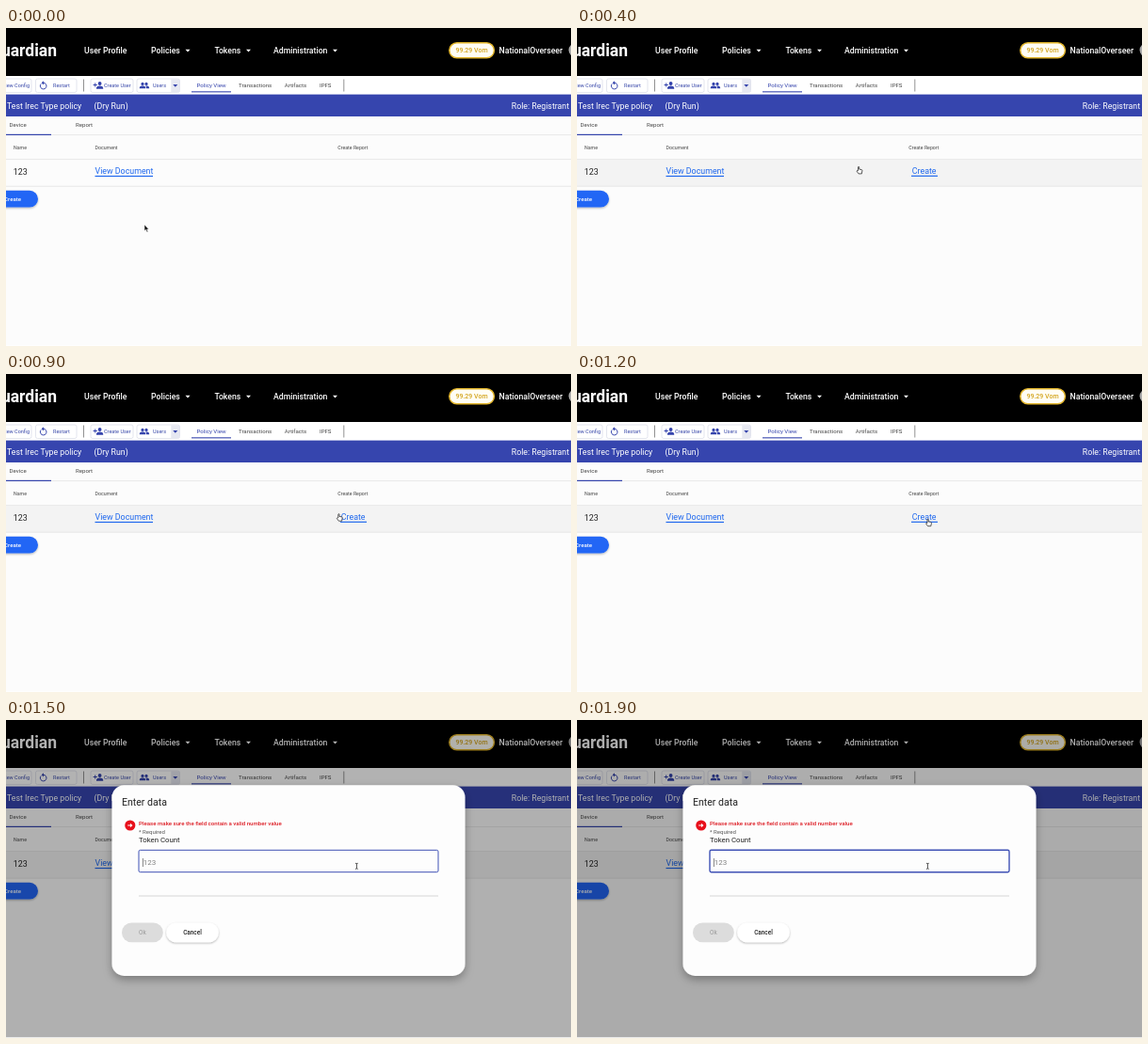
An HTML page that plays this animation: 600 by 338 pixels, repeating every 2 s.

```html
<!DOCTYPE html>
<html lang="en">
<head>
<meta charset="utf-8">
<title>Policy view</title>
<style>
  html, body { margin: 0; width: 100%; height: 100%; overflow: hidden; background: #fff; }
  svg { display: block; width: 100vw; height: 100vh; }
  text { font-family: Roboto, sans-serif; white-space: pre; }
  .m { font-weight: 500; }
  .nav { font-size: 8.7px; font-weight: 500; fill: #fff; }
  .tool { font-size: 5.5px; fill: #3646a8; }
  .tab { font-size: 6.1px; fill: #444; }
  .head { font-size: 5.25px; fill: #444; }
  .bar { font-size: 8.75px; fill: #fff; }
  .link { font-size: 8.85px; fill: #1f68ee; }
  .btn { fill: #fff; stroke: #dcdfea; stroke-width: .8; }
  .rule { stroke: #e2e2e2; stroke-width: .8; }
  .ink { fill: #3443ac; }
</style>
</head>
<body>
<svg viewBox="0 0 600 338" preserveAspectRatio="none">
  <defs>
    <filter id="soft" x="-20%" y="-30%" width="140%" height="180%">
      <feDropShadow dx="0" dy="1" stdDeviation="1" flood-opacity=".3"/>
    </filter>
    <filter id="deep" x="-10%" y="-15%" width="120%" height="140%">
      <feDropShadow dx="0" dy="4" stdDeviation="5" flood-opacity=".3"/>
    </filter>
  </defs>

  <rect width="600" height="338" fill="#fcfcfc"/>

  <!-- top navigation -->
  <rect width="600" height="51" fill="#000"/>
  <text x="54" y="30" text-anchor="end" font-size="17.5" font-weight="700" fill="#fff">Guardian</text>
  <g class="nav">
    <text x="83" y="26.5">User Profile</text>
    <text x="154" y="26.5">Policies</text>
    <text x="221.5" y="26.5">Tokens</text>
    <text x="284" y="26.5">Administration</text>
    <text x="523.5" y="26.5">NationalOverseer</text>
    <path d="M190.5 22.8h5l-2.5 2.6zM255 22.8h5l-2.5 2.6zM347 22.8h5l-2.5 2.6z"/>
  </g>
  <rect x="470.8" y="15.8" width="47.6" height="16" rx="8" fill="#fffdf4" stroke="#e3b62c" stroke-width="1.5"/>
  <text class="m" x="494.6" y="26.2" text-anchor="middle" font-size="7" fill="#d3a41d">99.29 Vorn</text>
  <circle cx="605" cy="23.5" r="7.5" fill="#aaa"/>

  <!-- toolbar -->
  <rect y="51" width="600" height="20" fill="#fff"/>
  <g class="btn">
    <rect x="-10" y="54" width="37" height="14.5" rx="2"/>
    <rect x="31.5" y="54" width="43.5" height="14.5" rx="2"/>
    <rect x="90" y="54" width="45" height="14.5" rx="2"/>
    <rect x="139" y="54" width="45.5" height="14.5" rx="2"/>
  </g>
  <rect x="175.3" y="54.4" width="8.8" height="13.7" fill="#e6e8f1"/>
  <path class="ink" d="M177.3 60h5l-2.5 2.8z"/>
  <path d="M82.5 54.5v13M358.8 54.5v13" stroke="#777" stroke-width=".8"/>
  <g class="tool">
    <text x="25" y="63" text-anchor="end">View Config</text>
    <text x="50" y="63">Restart</text>
    <text x="104" y="63">Create User</text>
    <text x="156" y="63">Users</text>
  </g>
  <path d="M37.2 59.4a3.3 3.3 0 1 0 2.4-1.1" fill="none" stroke="#3443ac" stroke-width="1"/>
  <path class="ink" d="M40 56.2v4.2l-2.4-2.1z"/>
  <g class="ink">
    <circle cx="99.6" cy="59" r="1.9"/>
    <path d="M96 64.8v-1c0-3 7.2-3 7.2 0v1zM94.2 58.4h1v1.6h1.6v1h-1.6v1.6h-1v-1.6h-1.6v-1h1.6z"/>
    <circle cx="145" cy="59.4" r="1.6"/>
    <circle cx="149" cy="59.4" r="1.6"/>
    <path d="M141.8 64.2v-.9c0-2.5 6.4-2.5 6.4 0v.9zM148.9 64.2v-.9c0-.8-.4-1.3-.9-1.6 2-.3 4.1.3 4.1 1.6v.9z"/>
  </g>
  <g class="tab">
    <text x="202.5" y="63" style="fill:#3443ac">Policy View</text>
    <text x="247" y="63">Transactions</text>
    <text x="295.7" y="63">Artifacts</text>
    <text x="333" y="63">IPFS</text>
  </g>
  <rect class="ink" x="197" y="67.3" width="42" height="1.1"/>

  <!-- title bar -->
  <rect y="70.6" width="600" height="23.4" fill="#3645ae"/>
  <g class="bar">
    <text x="1" y="86">Test Irec Type policy</text>
    <text x="93.5" y="86">(Dry Run)</text>
    <text x="598" y="86" text-anchor="end">Role: Registrant</text>
  </g>

  <!-- table -->
  <g class="tab">
    <text x="3.6" y="105.2">Device</text>
    <text x="74" y="105.2">Report</text>
  </g>
  <path class="rule" d="M0 113.6H600M0 139.6H600"/>
  <rect class="ink" y="112.8" width="48" height="1.2"/>
  <g class="head">
    <text x="8" y="129">Name</text>
    <text x="94.5" y="129">Document</text>
    <text x="352.3" y="129">Create Report</text>
  </g>
  <g id="hover">
    <rect y="140" width="600" height="28" fill="#f3f3f3"/>
    <text class="link" x="355.8" y="154.6">Create</text>
    <rect x="355" y="156.7" width="28" height="1.2" fill="#1f68ee"/>
  </g>
  <path class="rule" d="M0 168.2H600"/>
  <text x="7.7" y="155.5" font-size="8.9" fill="#222">123</text>
  <text class="link" x="94.5" y="154.8">View Document</text>
  <rect x="94.5" y="156.9" width="61.5" height="1.2" fill="#1f68ee"/>
  <rect x="-20" y="172.8" width="54" height="17.8" rx="8.9" fill="#2066f5" filter="url(#soft)"/>
  <text class="m" x="16" y="183.8" text-anchor="end" font-size="6.1" fill="#fff">Create</text>

  <rect id="shade" width="600" height="338" fill="#000"/>
  <rect y="337" width="600" height="1" fill="#fff" opacity=".75"/>

  <!-- dialog -->
  <g id="dialog">
    <rect x="112.5" y="69.3" width="375" height="202.6" rx="13" fill="#fdfdfd" filter="url(#deep)"/>
    <text x="123" y="90.5" font-size="10.55" fill="#222">Enter data</text>
    <circle cx="131.8" cy="112" r="5.6" fill="#e8101c"/>
    <path d="M129.2 111.5h2.7v-1.7l2.6 2.2-2.6 2.2v-1.7h-2.7z" fill="#fff"/>
    <text class="m" x="141" y="112.1" font-size="6.12" fill="#dd1a22">Please make sure the field contain a valid number value</text>
    <text x="141" y="120.6" font-size="6.05" fill="#555">* Required</text>
    <text x="141" y="130.4" font-size="7.8" fill="#222">Token Count</text>
    <rect id="field" x="141" y="138.3" width="318" height="23.4" rx="1.6" fill="none"/>
    <path d="M145.4 147v9" stroke="#333" stroke-width=".6"/>
    <text x="145.8" y="154.4" font-size="8" fill="#808080">123</text>
    <path d="M141 187H459" stroke="#ccc" stroke-width=".8"/>
    <rect x="123" y="215.6" width="43.8" height="20.6" rx="10.3" fill="#dcdcdc"/>
    <text x="144.8" y="228.2" text-anchor="middle" font-size="6.5" fill="#999">Ok</text>
    <rect x="170.2" y="215.6" width="55.6" height="20.6" rx="10.3" fill="#fff" filter="url(#soft)"/>
    <text class="m" x="198" y="228.2" text-anchor="middle" font-size="6.4" fill="#222">Cancel</text>
  </g>

  <!-- pointers, each drawn around its own centre -->
  <path id="arrow" d="M-2-4V2.6L-.5 1.3.7 4 1.8 3.5.7 1H2.6z" fill="#111" stroke="#fff" stroke-width=".5"/>
  <path id="hand" d="M-1.5.4V-3.2a.6.6 0 0 1 1.2 0V-1.1L2.2-.6Q3-.4 2.9.4L2.3 3.7H-1L-3 .9Q-2.7 0-1.5.4z" fill="#fff" stroke="#222" stroke-width=".75" stroke-linejoin="round"/>
  <path id="beam" d="M-1.3-3Q0-3 0-2.3Q0-3 1.3-3M0-2.4V2.4M-1.3 3Q0 3 0 2.3Q0 3 1.3 3" fill="none" stroke="#222" stroke-width=".8"/>
</svg>
<script>
  const LOOP = 2000, STEP = 100;
  const $ = id => document.getElementById(id);
  const show = (el, on) => el.setAttribute('visibility', on ? 'visible' : 'hidden');
  const pointers = { arrow: $('arrow'), hand: $('hand'), beam: $('beam') };

  // pointer stops: time, x, y
  const path = [
    [0, 149, 213], [200, 216, 179], [300, 267, 159], [400, 300, 151.2], [500, 306, 150.5],
    [600, 306, 150.5], [700, 317, 150.8], [900, 354.3, 152.5], [1000, 364, 154.5], [1200, 373.5, 158]
  ];

  function pointerAt(t) {
    const i = path.findIndex(p => p[0] > t);
    if (i < 0) return path[path.length - 1].slice(1);
    const [t0, x0, y0] = path[i - 1], [t1, x1, y1] = path[i];
    const k = (t - t0) / (t1 - t0);
    return [x0 + (x1 - x0) * k, y0 + (y1 - y0) * k];
  }

  function draw(ms) {
    const t = Math.floor((ms % LOOP) / STEP) * STEP;
    const open = t >= 1400;
    const [x, y] = open ? [372.4, 155.3] : pointerAt(t);
    const inRow = y < 168;
    const kind = open ? 'beam' : inRow ? 'hand' : 'arrow';
    for (const name in pointers) show(pointers[name], name === kind);
    pointers[kind].setAttribute('transform', `translate(${x} ${y})`);
    show($('hover'), inRow);

    const opening = t < 1500;
    const scale = opening ? 0.939 : 1;
    show($('dialog'), open);
    $('dialog').setAttribute('opacity', opening ? 0.82 : 1);
    $('dialog').setAttribute('transform', `translate(300 170.5) scale(${scale}) translate(-300 -170.5)`);
    $('field').setAttribute('stroke', opening ? '#777' : '#3f51b5');
    $('field').setAttribute('stroke-width', t < 1600 ? 1 : 1.4);
    $('shade').setAttribute('opacity', !open ? 0 : opening ? 0.2 : t < 1600 ? 0.3 : 0.32);
  }

  const start = performance.now();
  function tick() {
    draw(performance.now() - start);
    requestAnimationFrame(tick);
  }
  tick();
</script>
</body>
</html>
```
